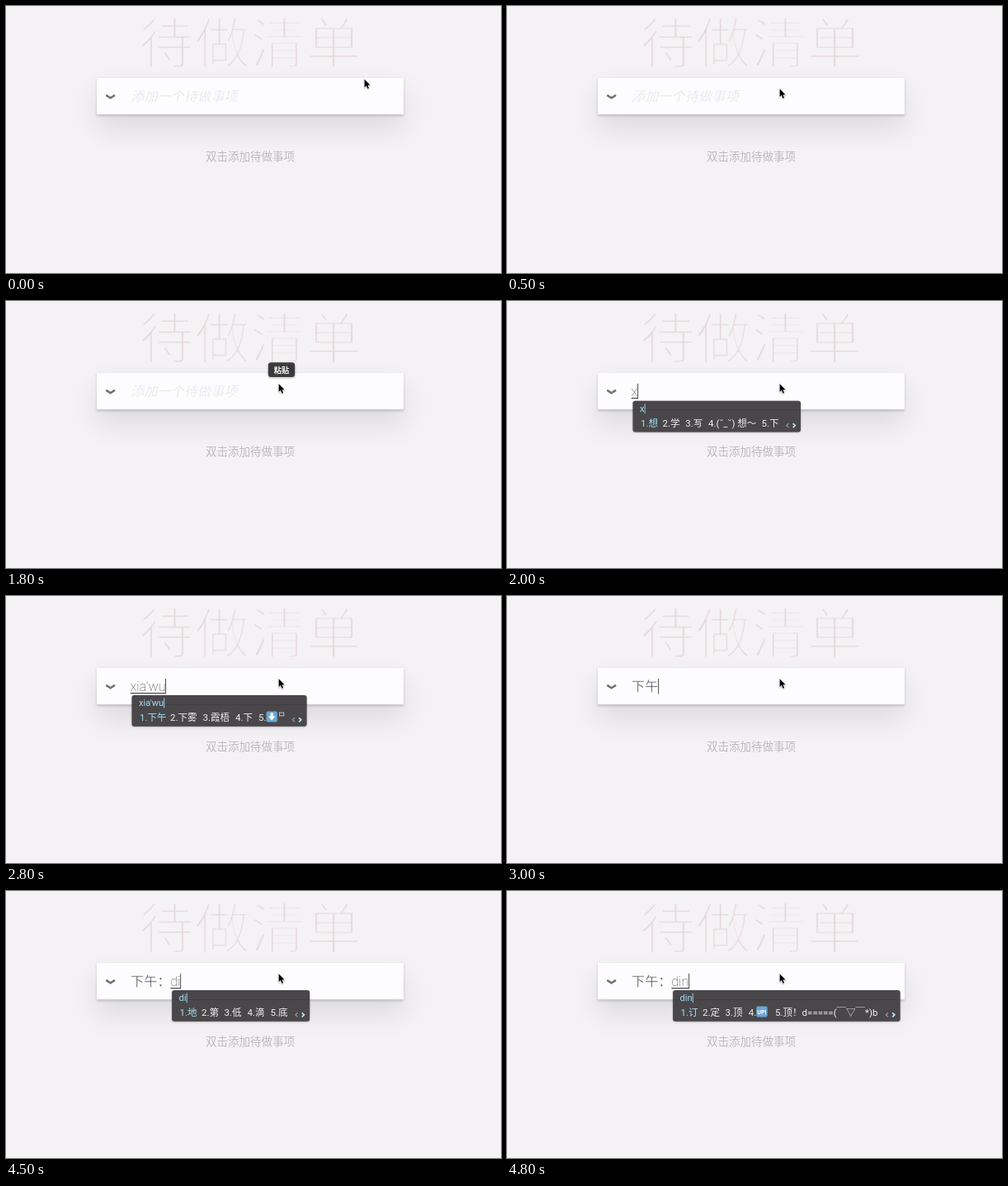
Write an HTML page with a canvas that moves like this. It is 600 by 323 pixels and loops after 4.9 s.

```html
<!DOCTYPE html>
<html lang="zh-CN">
<head>
<meta charset="utf-8">
<title>待做清单</title>
<style>
html, body { margin: 0; width: 100%; height: 100%; overflow: hidden; background: #f4f2f5; }
canvas { display: block; }
</style>
</head>
<body>
<canvas id="stage" width="600" height="323"></canvas>
<script>
const LOOP = 4900;
const CJK = '"Noto Sans CJK SC", sans-serif';
const LATIN = 'Roboto, "Noto Sans CJK SC", sans-serif';
const TEXT_X = 151, FIELD_SIZE = 16.2, BASELINE = 115;
const CYAN = '#a5def3', PALE = '#f1f0f2';
const ctx = document.getElementById('stage').getContext('2d');

// Each candidate is [x offset from the panel's left edge, text, optional badge].
const panels = {
  x: { y: 120.8, width: 203.5, items: [[9.5, '1.想'], [36, '2.学'], [63.7, '3.写'], [91.5, '4.(˘_˘) 想～'], [156, '5.下']] },
  xi: { y: 120, width: 212, items: [[9.5, '1.喜欢'], [46.5, '2.希望'], [86, '3.系统'], [125.5, '4.细'], [153.5, '5.洗']] },
  "xia'wu": { y: 120, width: 212, items: [[9.5, '1.下午'], [46.5, '2.下雾'], [86, '3.霞梧'], [125.5, '4.下'], [153.5, '5.', 'down']] },
  di: { y: 120, width: 167, items: [[9.5, '1.地'], [36, '2.第'], [63.5, '3.低'], [91.3, '4.滴'], [119.5, '5.底']] },
  din: { y: 120, width: 275.5, items: [[9.5, '1.订'], [36, '2.定'], [63.5, '3.顶'], [91.7, '4.', 'up'], [124, '5.顶！d=====(￣▽￣*)b']] }
};

const timeline = [
  { at: 0, mouse: [434.5, 88.7] },
  { at: 300, mouse: [348.6, 89.7] },
  { at: 500 },
  { at: 1000, caret: true },
  { at: 1300, caret: true, tip: 0.52 },
  { at: 1500, tip: 0.78 },
  { at: 2000, pinyin: 'x' },
  { at: 2300, pinyin: 'xi' },
  { at: 2500, pinyin: "xia'wu" },
  { at: 3000, text: '下午', caret: true },
  { at: 3500, text: '下午：', caret: true },
  { at: 4000, text: '下午：' },
  { at: 4500, text: '下午：', pinyin: 'di' },
  { at: 4800, text: '下午：', pinyin: 'din' }
];

function makeCanvas(width, height) {
  const canvas = document.createElement('canvas');
  canvas.width = Math.ceil(width);
  canvas.height = Math.ceil(height);
  return canvas.getContext('2d');
}

function inkOf(weight) {
  const c = makeCanvas(80, 80);
  c.font = `${weight} 64px ${CJK}`;
  c.fillText('单', 8, 64);
  return c.getImageData(0, 0, 80, 80).data.reduce((sum, v) => sum + v, 0);
}
const hasThin = inkOf(100) < inkOf(400) * 0.7;

// Hairline CJK text; without a thin face, the regular one is shaved along its outline.
const sprites = new Map();
function thinText(text, x, y, size, color, shave, style = '') {
  const key = text + size + style;
  const scale = 4, pad = size;
  if (!sprites.has(key)) {
    const c = makeCanvas((text.length * size + 2 * pad) * scale, size * 2 * scale);
    c.scale(scale, scale);
    c.font = `${style} 100 ${size}px ${CJK}`;
    c.fillStyle = color;
    c.fillText(text, pad, size * 1.4);
    if (!hasThin) {
      c.globalCompositeOperation = 'destination-out';
      c.lineWidth = size * shave;
      c.strokeText(text, pad, size * 1.4);
    }
    sprites.set(key, c.canvas);
  }
  const sprite = sprites.get(key);
  ctx.imageSmoothingQuality = 'high';
  ctx.drawImage(sprite, x - pad, y - size * 1.4, sprite.width / scale, sprite.height / scale);
}

function write(text, x, y, font, color) {
  ctx.font = font;
  ctx.fillStyle = color;
  ctx.fillText(text, x, y);
  return ctx.measureText(text).width;
}

function box(x, y, w, h, r, color) {
  ctx.fillStyle = color;
  ctx.beginPath();
  ctx.roundRect(x, y, w, h, r);
  ctx.fill();
}

function line(points, color, width) {
  ctx.strokeStyle = color;
  ctx.lineWidth = width;
  ctx.beginPath();
  points.forEach(([x, y]) => ctx.lineTo(x, y));
  ctx.stroke();
}

function withShadow(color, blur, dy, draw) {
  ctx.save();
  ctx.shadowColor = color;
  ctx.shadowBlur = blur;
  ctx.shadowOffsetY = dy;
  draw();
  ctx.restore();
}

function drawPage() {
  ctx.fillStyle = '#f4f2f5';
  ctx.fillRect(0, 0, 600, 323);
  thinText('待做清单', 161, 70, 67.5, '#e5d6d6', 0.05);
  const card = () => box(110, 87, 372, 44.3, 0, '#fdfcff');
  withShadow('rgba(0,0,0,.1)', 34, 17, card);
  withShadow('rgba(0,0,0,.2)', 2.7, 1.35, card);
  ctx.fillStyle = 'rgba(0,0,0,.03)';
  ctx.fillRect(110, 130, 372, 1.3);
  line([[121.3, 107.9], [126.6, 111.2], [132, 107.9]], '#717073', 2.5);
  const info = '双击添加待做事项', font = `13.5px ${CJK}`;
  write(info, 242, 188, font, 'rgba(255,255,255,.5)');
  write(info, 242, 187, font, '#bbb9bc');
}

function drawBadge(kind, x, y) {
  box(x, y, 13.3, 13, 2, '#6aa6d2');
  if (kind === 'up') {
    write('UP!', x + 1, y + 9.2, 'bold 7px Roboto, sans-serif', '#fff');
    return;
  }
  const cx = x + 6.6;
  line([[cx, y + 2], [cx, y + 8]], '#fff', 3.2);
  ctx.fillStyle = '#fff';
  ctx.beginPath();
  [[-4.3, 6.2], [4.3, 6.2], [0, 11]].forEach(([dx, dy]) => ctx.lineTo(cx + dx, y + dy));
  ctx.fill();
  ctx.strokeStyle = '#d5d4d6';
  ctx.lineWidth = 0.8;
  ctx.strokeRect(x + 15.9, y + 1.7, 5.4, 3.8);
}

function drawPanel(pinyin, x) {
  const { y, width, items } = panels[pinyin];
  withShadow('rgba(0,0,0,.35)', 2, 0.6, () => box(x, y, width, 37.7, 3, '#49474a'));
  ctx.fillStyle = 'rgba(0,0,0,.13)';
  ctx.fillRect(x, 131, width, 1);
  const typed = write(pinyin, x + 8.5, y + 13.3, `11px ${LATIN}`, CYAN);
  ctx.fillRect(x + 8.7 + typed, y + 3.6, 0.9, 11.8);
  items.forEach(([dx, text, badge], i) => {
    const w = write(text, x + dx, y + 31, `11.5px ${LATIN}`, i ? PALE : CYAN);
    if (badge) drawBadge(badge, x + dx + w, y + 19.4);
  });
  const right = x + width, mid = y + 29.8;
  line([[right - 14.6, mid - 2.5], [right - 17.2, mid], [right - 14.6, mid + 2.5]], '#908f92', 1.4);
  line([[right - 9.4, mid - 2.5], [right - 6.8, mid], [right - 9.4, mid + 2.5]], '#b4e6fa', 1.7);
}

function drawField({ text = '', pinyin = '', caret }) {
  if (text) thinText(text, TEXT_X, BASELINE, FIELD_SIZE, '#4b4a4c', 0.025);
  else if (!pinyin) thinText('添加一个待做事项', TEXT_X, BASELINE, FIELD_SIZE, '#e2e0e3', 0.025, 'italic');
  const start = TEXT_X + text.length * FIELD_SIZE;
  let end = start;
  if (pinyin) {
    end += write(pinyin, start - 0.4, BASELINE, `200 ${FIELD_SIZE}px ${LATIN}`, '#454446');
    ctx.fillRect(start - 0.2, 117, end - start, 1.2);
  }
  if (caret || pinyin) {
    ctx.fillStyle = '#5d5c5f';
    ctx.fillRect(Math.floor(end - 0.3), 100, 1.1, 18.5);
  }
  if (pinyin) drawPanel(pinyin, start + 1.5);
}

function drawTip(alpha) {
  const shade = `rgba(24,24,24,${alpha})`;
  withShadow(`rgba(0,0,0,${alpha * 0.4})`, 3, 1.2, () => box(317.8, 74.3, 32.4, 17.7, 3.5, shade));
  write('粘贴', 324.8, 86.7, `bold 9.2px ${CJK}`, '#fff');
}

function drawMouse([x, y]) {
  const shape = [[0, 0], [0, 9.8], [2.2, 7.8], [3.8, 11.4], [5.5, 10.6], [3.9, 7.1], [6.9, 6.9]];
  ctx.beginPath();
  shape.forEach(([dx, dy]) => ctx.lineTo(x + dx, y + dy));
  ctx.closePath();
  ctx.strokeStyle = '#fff';
  ctx.lineWidth = 1.3;
  withShadow('rgba(0,0,0,.3)', 1.5, 0.7, () => ctx.stroke());
  ctx.fillStyle = '#000';
  ctx.fill();
}

let shown;
const origin = performance.now();
function tick() {
  const t = (performance.now() - origin) % LOOP;
  const state = timeline.findLast(step => step.at <= t);
  if (state !== shown) {
    shown = state;
    drawPage();
    drawField(state);
    if (state.tip) drawTip(state.tip);
    drawMouse(state.mouse || [330.6, 100.3]);
  }
  requestAnimationFrame(tick);
}
tick();
</script>
</body>
</html>
```
